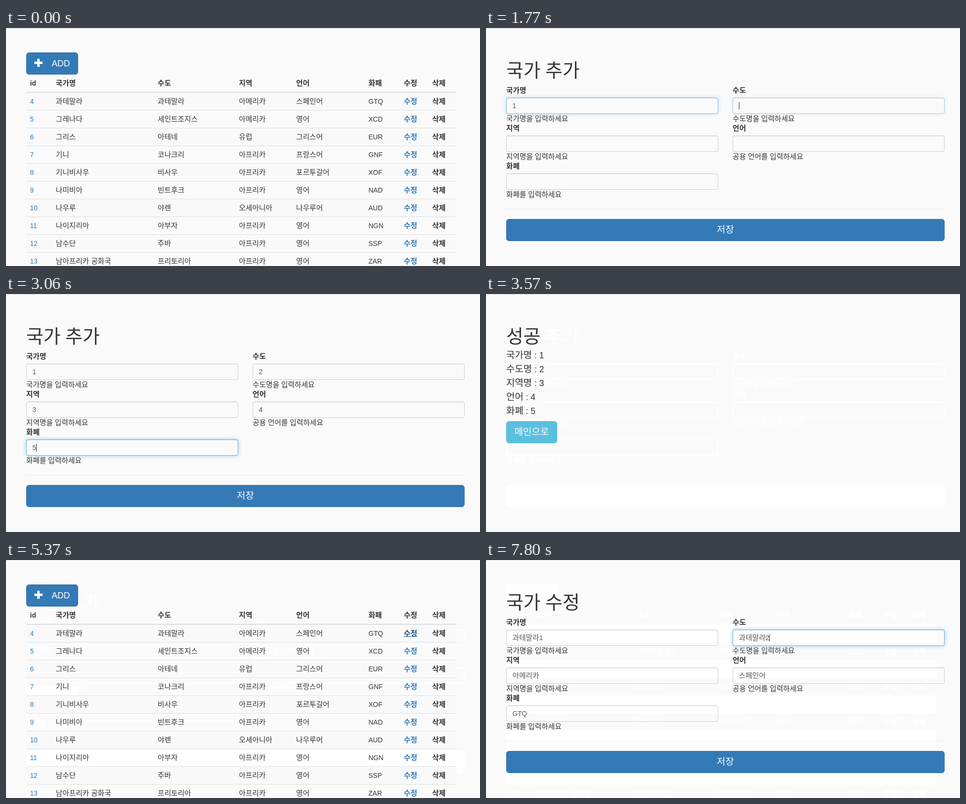
An HTML page that plays this animation: 986x496 px, repeating every 8 s.

```html
<!DOCTYPE html>
<html lang="ko">
<head>
<meta charset="utf-8">
<title>국가 목록</title>
<style>
html, body { margin: 0; width: 100%; height: 100%; overflow: hidden; background: #fafafa; }
body { position: relative; font: 14px/20px "Liberation Sans", "Noto Sans CJK KR", "Noto Sans CJK", sans-serif; color: #333; }
[hidden] { display: none !important; }
#stage { position: absolute; left: 0; top: 0; width: 986px; height: 496px; overflow: hidden; }
#stage::before { content: ""; position: absolute; width: 100%; height: 1px; background: #d9d9d9; }
.view { position: absolute; inset: 0; }
.t, .box, .btn, .in { position: absolute; box-sizing: border-box; white-space: pre; }
.k { font-size: 1.08em; line-height: 0; }
.b { font-weight: 700; }
.h { font-size: 36px; line-height: 40px; font-weight: 300; }
.l { font-size: 18px; }
.a { color: #337ab7; }
.a.over { color: #23527c; text-decoration: underline; }
.rule { background: #ddd; }
.hr { background: #eee; }
.stripe { background: #f9f9f9; }
.mask { background: #fafafa; }
.btn { height: 46px; border: 1px solid #2e6da4; border-radius: 6px; background: #337ab7; color: #fff;
  font-size: 18px; line-height: 44px; text-align: center; }
.btn.over { background: #286090; border-color: #204d74; }
.btn.info { background: #5bc0de; border-color: #46b8da; }
.btn.info.over { background: #31b0d5; border-color: #269abc; }
.btn.down { box-shadow: inset 0 3px 5px rgba(0,0,0,.125); }
.btn svg { position: absolute; left: 16px; top: 12px; }
.in { width: 441px; height: 34px; padding-left: 12px; border: 1px solid #ccc; border-radius: 4px;
  line-height: 32px; color: #555; box-shadow: inset 0 1px 1px rgba(0,0,0,.075); }
.in::after { content: ""; position: absolute; inset: -1px; border: 1px solid #66afe9; border-radius: 4px;
  box-shadow: 0 0 8px rgba(102,175,233,.6); opacity: var(--glow, 0); }
.in i { display: inline-block; width: 1px; height: 16px; background: #222; vertical-align: -3px; }
.ghost .t, .ghost .in { color: #fff; text-shadow: 0 0 1px #fff; }
.ghost .rule, .ghost .hr, .ghost .stripe { background: #fff; }
.ghost .btn { background: #fff; border-color: #fff; }
.ghost .in { border: 2px solid #fff; padding-left: 11px; line-height: 30px; box-shadow: none; }
.ghost i, .ghost .in::after { display: none; }
</style>
</head>
<body>
<div id="stage"></div>
<script>
const LOOP = 8000, FADE = 150;
const stage = document.getElementById('stage');

const ko = s => s.replace(/[가-힣]+/g, '<span class="k">$&</span>');
const text = (x, y, s, cls = '') => `<div class="t ${cls}" style="left:${x}px;top:${y}px">${ko(s)}</div>`;
const box = (x, y, w, h, cls) => `<div class="box ${cls}" style="left:${x}px;top:${y}px;width:${w}px;height:${h}px"></div>`;
const btn = (x, y, w, html, cls = '') => `<div class="btn ${cls}" style="left:${x}px;top:${y}px;width:${w}px">${html}</div>`;

function listView() {
  const cols = [50, 103.5, 315.5, 484.5, 603.5, 754, 827.5, 886.5];
  const rows = `과테말라,과테말라,아메리카,스페인어,GTQ
그레나다,세인트조지스,아메리카,영어,XCD
그리스,아테네,유럽,그리스어,EUR
기니,코나크리,아프리카,프랑스어,GNF
기니비사우,비사우,아프리카,포르투갈어,XOF
나미비아,빈트후크,아프리카,영어,NAD
나우루,야렌,오세아니아,나우루어,AUD
나이지리아,아부자,아프리카,영어,NGN
남수단,주바,아프리카,영어,SSP
남아프리카 공화국,프리토리아,아프리카,영어,ZAR`.split('\n');
  const plus = '<svg width="17" height="17"><path d="M6 0h5v6h6v5h-6v6h-5v-6h-6v-5h6z" fill="#fff"/></svg>';
  let html = btn(42, 51, 108, plus + '<span style="position:absolute;left:52px">ADD</span>');
  'id,국가명,수도,지역,언어,화패,수정,삭제'.split(',').forEach((s, i) => html += text(cols[i], 105, s, 'b'));
  html += box(42, 133, 895, 2, 'rule');
  rows.forEach((row, r) => {
    const y = 135 + 37 * r;
    if (r % 2 === 0) html += box(42, y, 895, 36, 'stripe');
    html += box(42, y + 36, 895, 1, 'rule');
    [String(r + 4), ...row.split(','), '수정', '삭제'].forEach((s, i) => {
      const cls = i === 0 ? 'a' : i === 6 ? 'a b edit' : i === 7 ? 'b' : '';
      html += text(cols[i], y + 8, s, cls);
    });
  });
  return html;
}

function formView(title, values, keys) {
  const labels = ['국가명', '수도', '지역', '언어', '화폐'];
  const hints = ['국가명을', '수도명을', '지역명을', '공용 언어를', '화폐를'];
  let html = text(42, 70, title, 'h');
  labels.forEach((s, i) => {
    const x = i % 2 ? 513 : 42, y = 120 + 79 * (i >> 1);
    html += text(x, y, s, 'b') + text(x, y + 59, hints[i] + ' 입력하세요');
    html += `<div class="in" style="left:${x}px;top:${y + 25}px">${ko(values[i] || '')}<span>${keys[i] || ''}</span><i></i></div>`;
  });
  return html + box(42, 377, 912, 1, 'hr') + btn(42, 398, 912, ko('저장'));
}

function doneView() {
  let html = box(42, 66, 80, 194, 'mask') + text(42, 70, '성공', 'h');
  ['국가명', '수도명', '지역명', '언어', '화폐'].forEach((s, i) => html += text(42, 118 + 29 * i, `${s} : ${i + 1}`, 'l'));
  return html + btn(42, 265, 106, ko('메인으로'), 'info');
}

function view(html, cls = '') {
  const el = document.createElement('div');
  el.className = 'view ' + cls;
  el.innerHTML = html;
  return stage.appendChild(el);
}

const addHtml = formView('국가 추가', [], '12345');
const editHtml = formView('국가 수정', ['과테말라', '과테말라', '아메리카', '스페인어', 'GTQ'], '12');

// leftovers of earlier pages lie beneath the live ones
const oldAdd = view(addHtml, 'ghost');
const oldDone = view(doneView(), 'ghost');
const oldList = view(listView(), 'ghost');
const list = view(listView());
const add = view(addHtml);
const done = view(doneView());
const edit = view(editHtml);

// per field: focus, key press, blur
const addSteps = [[1395, 1590, 1718], [1718, 1890, 2022], [2022, 2220, 2385], [2385, 2580, 2745], [2745, 3060, 3400]];
const editSteps = [[6945, 7260, 7515], [7515, 7800, 9000]];

const during = (t, from, to) => t >= from && t < to;
const ease = x => (x = Math.min(1, Math.max(0, x)), x * x * (3 - 2 * x));

function fields(form, steps, t) {
  form.querySelectorAll('.in').forEach((el, i) => {
    const [on, key, off] = steps[i] || [LOOP, LOOP, LOOP];
    el.style.setProperty('--glow', ease((t - on) / FADE) - ease((t - off) / FADE));
    el.querySelector('i').hidden = !during(t, on, off);
    el.querySelector('i').previousSibling.hidden = t < key;
  });
}

const toggle = (root, sel, cls, on) => root.querySelector(sel).classList.toggle(cls, on);

function draw(t) {
  list.hidden = !(t < 870 || during(t, 4620, 6240));
  add.hidden = !during(t, 870, 3570);
  done.hidden = !during(t, 3570, 4620);
  edit.hidden = t < 6240;
  oldAdd.hidden = !during(t, 3570, 6240);
  oldDone.hidden = !during(t, 4620, 6240);
  oldList.hidden = t < 6240;

  toggle(list, '.btn', 'over', during(t, 540, 870));
  toggle(list, '.edit', 'over', during(t, 5370, 6240));
  toggle(add, '.btn', 'over', t >= 3300);
  toggle(add, '.btn', 'down', t >= 3400);
  toggle(done, '.btn', 'over', t >= 4230);
  toggle(done, '.btn', 'down', during(t, 4380, 4470));
  fields(add, addSteps, t);
  fields(edit, editSteps, t);
}

const start = performance.now();
function tick() {
  draw((performance.now() - start) % LOOP);
  requestAnimationFrame(tick);
}
tick();
</script>
</body>
</html>
```
